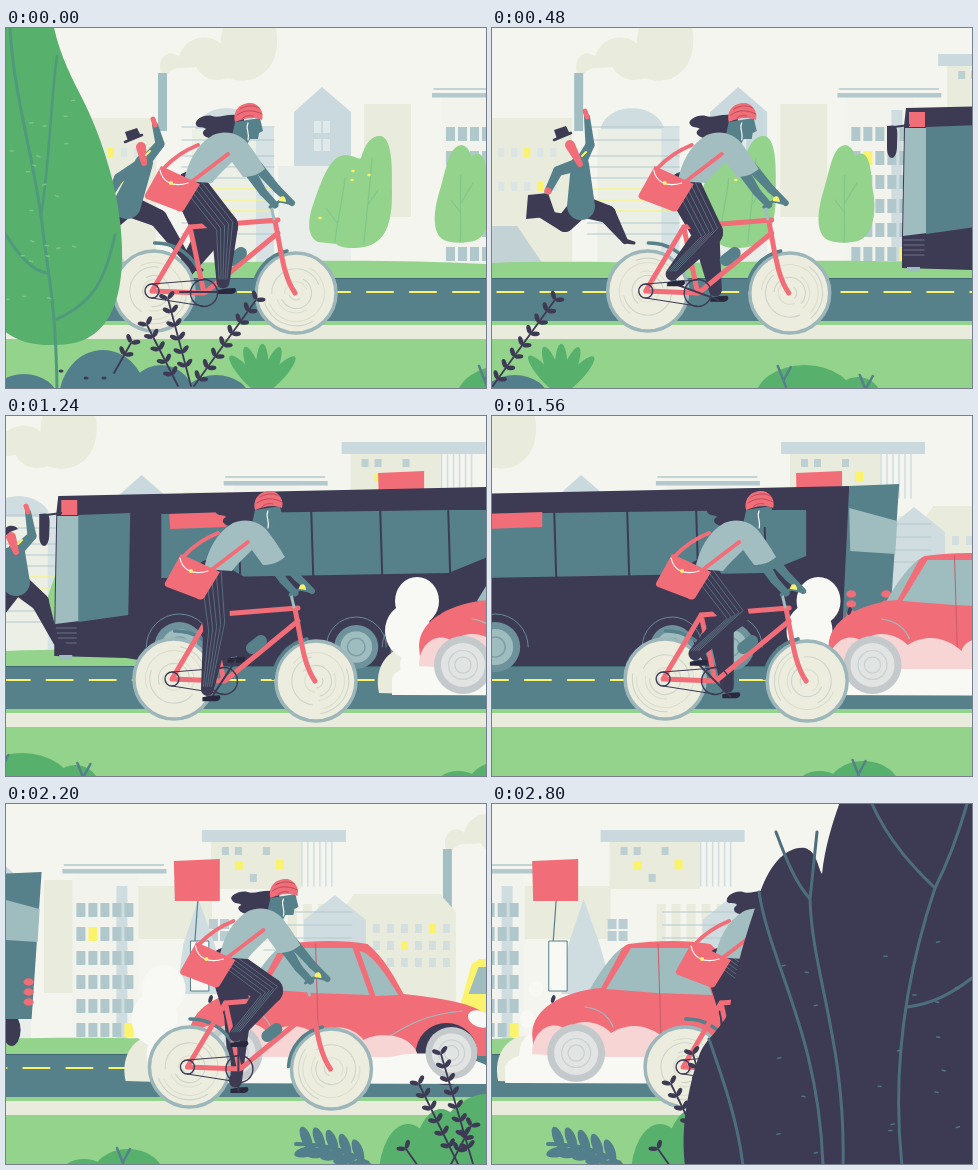
An HTML page with a canvas that plays this animation: 480x360 px, repeating every 2.84 s.

```html
<!DOCTYPE html>
<html lang="en">
<head>
<meta charset="utf-8">
<title>City ride</title>
<style>
html, body { margin: 0; width: 100%; height: 100%; overflow: hidden; background: #f4f5ef; }
canvas { display: block; width: 480px; height: 360px; }
</style>
</head>
<body>
<canvas id="stage" width="480" height="360"></canvas>
<script>
const g = document.getElementById('stage').getContext('2d');
const LOOP = 2840, STEP = 40;
const C = {
  sky: '#f4f5ef', cream: '#e9ebdc', mist: '#cfdde0', haze: '#b3c9ce', steel: '#9fbcbf',
  teal: '#56808a', ink: '#3d3a54', red: '#f16e78', pink: '#f6d5d4', yellow: '#fbf36c',
  lime: '#93d38c', green: '#57b06c', white: '#f8f8f4', blue: '#527f8b'
};

// Drawing helpers
function fill(color, d) { g.fillStyle = color; g.fill(new Path2D(d)); }
function line(color, width, d) {
  g.strokeStyle = color; g.lineWidth = width;
  g.lineCap = g.lineJoin = 'round';
  g.stroke(new Path2D(d));
}
function rect(color, x, y, w, h) { g.fillStyle = color; g.fillRect(x, y, w, h); }
function oval(color, x, y, rx, ry = rx, turn = 0) {
  g.fillStyle = color; g.beginPath(); g.ellipse(x, y, rx, ry, turn, 0, 7); g.fill();
}
function ring(color, width, x, y, r, from = 0, to = 2 * Math.PI) {
  g.strokeStyle = color; g.lineWidth = width; g.lineCap = 'round';
  g.beginPath(); g.arc(x, y, r, from, to); g.stroke();
}
function layer(x, draw) { g.save(); g.translate(x, 0); draw(); g.restore(); }
function limb(color, a, b, wa, wb) {
  const n = Math.atan2(b[1] - a[1], b[0] - a[0]);
  g.fillStyle = color; g.beginPath();
  g.arc(a[0], a[1], wa / 2, n + Math.PI / 2, n - Math.PI / 2);
  g.arc(b[0], b[1], wb / 2, n - Math.PI / 2, n + Math.PI / 2);
  g.fill();
}
function keyed(t, times, values) {
  let i = 0;
  while (i < times.length - 2 && t > times[i + 1]) i++;
  const k = Math.min(1, (t - times[i]) / (times[i + 1] - times[i]));
  return values[i] + (values[i + 1] - values[i]) * k;
}
function flecks(color, n, x, y, w, h) {
  let seed = 7;
  const rnd = () => (seed = seed * 16807 % 2147483647) / 2147483647;
  for (let i = 0; i < n; i++) {
    const px = x + rnd() * w, py = y + rnd() * h;
    line(color, 1.5, `M${px},${py}l3,${rnd() * 2 - 1}`);
  }
}

// Distant skyline
function chimney() {
  fill(C.cream, 'M155,45C150,30 164,19 173,29C178,9 202,4 215,16C212,-30 275,-30 271,15C270,45 246,59 222,50C206,56 194,47 190,39C180,41 168,37 162,46Z');
  rect('#a3bfc4', 152, 45, 9, 58);
}
function wires(x, w, ys, color) { for (const y of ys) line(color, 1.2, `M${x},${y}h${w}`); }
function skyline() {
  chimney();
  layer(605, chimney);
  rect(C.cream, 60, 90, 90, 150);
  for (let i = 0; i < 10; i++)
    rect(i === 2 || i === 8 ? C.yellow : '#dbe5e3', 76 + i % 5 * 13, i < 5 ? 120 : 154, 6, 9);
  fill('#c3d2d4', 'M70,198H95L120,235H70Z');
  rect('#e9eeea', 272, 138, 73, 97);
  fill('#cad9dd', 'M288,84L316,59L345,84V138H288Z');
  for (const y of [93, 111]) { rect('#e1eaeb', 308, y, 7, 12); rect('#e1eaeb', 317, y, 7, 12); }
  rect(C.cream, 358, 76, 47, 113);
  rect(C.cream, 440, 82, 86, 53);
  rect(C.cream, 525, 38, 90, 47);
  rect('#c9d9dd', 516, 26, 144, 12);
  for (let x = 616; x < 652; x += 6) line(C.mist, 1.5, `M${x},38V82`);
  for (const [x, y] of [[536, 43], [549, 43], [577, 43], [564, 70]]) rect('#bccfd3', x, y, 7, 8);
  rect(C.yellow, 549, 57, 8, 9); rect(C.yellow, 590, 56, 8, 9);
  for (const x of [523, 534]) for (const y of [115, 127]) rect('#b9cdd2', x, y, 9, 10);
  for (let x = 572; x < 635; x += 15) rect(C.cream, x, 100, 9, 38);
  fill(C.cream, 'M655,110L668,90H754L770,108V205H655Z');
  fill(C.mist, 'M618,116L649,91L680,116V235H618Z');
  wires(578, 88, [108, 121, 134, 146], C.haze);
  for (let i = 0; i < 18; i++)
    rect(i === 4 || i === 8 ? C.yellow : '#d3dfdf', 687 + i % 6 * 14, 120 + 17 * Math.floor(i / 6), 7, 9);
}
function nearBlocks() {
  fill(C.mist, 'M189,102C194,73 247,73 253,102Z');
  rect('#ecefe6', 186, 101, 66, 134);
  rect('#d6e2e4', 250, 100, 18, 135);
  wires(176, 92, [99, 112, 128, 139, 150, 195, 206], C.haze);
  wires(176, 92, [161, 172, 183], C.yellow);
  rect('#f2f3ec', 436, 69, 66, 166);
  rect(C.mist, 480, 82, 11, 153);
  line(C.haze, 1.5, 'M428,61H527');
  rect(C.haze, 426, 65, 104, 4.5);
  for (let col = 0; col < 5; col++) for (let row = 0; row < 6; row++) {
    const lit = col === 1 && row === 1 || col === 4 && row === 5;
    rect(lit ? C.yellow : '#b0c7cb', 440 + col * 12, 99 + row * 24, 9, 14);
  }
  fill(C.mist, 'M562,95L578,140L592,190H540L547,140Z');
}

// Roadside
function trees() {
  fill(C.lime, 'M312,214C300,208 302,190 308,174C317,148 325,127 340,127C350,128 352,132 355,130C360,112 368,107 375,108C387,112 386,140 386,165C386,195 380,215 358,219C345,221 335,220 330,216Z');
  line('#84c58d', 1.2, 'M329,214C330,200 336,175 339,150M358,215C360,190 364,160 366,130M331,195L320,180M361,178L372,162');
  for (const [x, y] of [[346, 152], [363, 147], [347, 143], [314, 190]]) oval(C.yellow, x, y, 1.8, 1.3);
  fill(C.lime, 'M438,212C426,206 427,185 433,165C440,143 442,119 455,117C465,118 465,132 466,128C478,118 482,140 482,158C488,180 484,208 468,213C455,216 445,215 438,212Z');
  line('#84c58d', 1.2, 'M454,214C456,200 453,175 455,147M455,185L445,172M455,175L467,155');
  layer(636, () => {
    line(C.teal, 1.2, 'M24,96L21,138');
    rect(C.white, 17, 137, 18, 50);
    line(C.teal, 1, 'M17,137h18v50h-18Z');
    fill(C.red, 'M0,57L46,55V97L1,97Z');
  });
}
function ground(t) {
  fill(C.lime, 'M0,235C80,232 150,236 240,234S400,232 480,236V252H0Z');
  rect(C.teal, 0, 250, 480, 44);
  line('#3f6671', 1.2, 'M0,250.5H480');
  const start = ((275 - t * .293) % 43 + 43) % 43 - 43;
  for (let x = start; x < 480; x += 43) line(C.yellow, 2.2, `M${x},264h26`);
  rect(C.lime, 0, 293, 480, 4);
  rect(C.cream, 0, 297, 480, 15);
  rect(C.lime, 0, 311, 480, 49);
}

// Man hailing the bus: joint positions at four moments
const MAN_TIMES = [0, 480, 840, 1240];
const MAN = {
  head: [135, 78, 62, 5, 119, 117, 129, 121],
  neck: [138, 88, 65, 10, 135, 136, 148, 136],
  hip: [121, 89, 62, 10, 177, 178, 184, 166],
  elbow: [154, 98, 86, 26, 116, 117, 140, 120],
  hand: [149, 95, 93, 22, 97, 89, 114, 96],
  elbow2: [113, 66, 45, -10, 150, 143, 155, 140],
  hand2: [105, 56, 23, -20, 165, 163, 168, 160],
  knee: [152, 115, 67, 34, 190, 186, 213, 186],
  foot: [187, 133, 65, 50, 240, 213, 242, 226],
  knee2: [100, 73, 57, -10, 198, 195, 212, 195],
  foot2: [90, 44, 47, -25, 215, 184, 240, 220]
};
function man(t) {
  const p = {};
  for (const k in MAN) p[k] = [keyed(t, MAN_TIMES, MAN[k].slice(0, 4)), keyed(t, MAN_TIMES, MAN[k].slice(4))];
  layer(-Math.max(0, t - 1240) * .25, () => {
    limb(C.teal, p.neck, p.elbow2, 13, 10);
    limb(C.teal, p.elbow2, p.hand2, 10, 7);
    const [bx, by] = p.hand2;
    fill(C.ink, `M${bx - 20},${by + 4}l20,-2l8,23l-30,3Z`);
    oval(C.red, bx, by, 3.5);
    for (const s of ['2', '']) {
      const knee = p['knee' + s], foot = p['foot' + s];
      limb(C.ink, p.hip, knee, 22, 18);
      limb(C.ink, knee, foot, 18, 6);
      limb(C.ink, foot, [foot[0] + 9, foot[1] + 2], 5, 3);
    }
    limb(C.teal, p.neck, p.hip, 18, 28);
    limb(C.teal, p.neck, p.elbow, 12, 9);
    limb(C.teal, p.elbow, p.hand, 9, 6);
    limb(C.red, p.hand, [p.hand[0] - 2, p.hand[1] - 6], 5, 5);
    limb(C.red, p.head, p.neck, 10, 6);
    const [hx, hy] = p.head;
    line(C.yellow, 2, `M${p.neck[0] + 2},${p.neck[1] - 8}l4,-4`);
    if (t < 700) {
      line(C.ink, 2.5, `M${hx - 16},${hy - 5}l17,-7`);
      fill(C.ink, `M${hx - 13},${hy - 6}l-3,-9l6,-2l6,-2l4,8Z`);
    } else fill(C.ink, `M${hx - 7},${hy}c-3,-12 10,-14 14,-8l-8,3Z`);
  });
}

// Vehicles
function busWheel(x, r) {
  oval('#6d929b', x, 231, r); oval(C.steel, x, 231, r * .72);
  ring('#7c9ea5', 1.5, x, 231, r * .4);
}
function bus() {
  fill(C.ink, 'M2,80L477,70V214L445,220L420,250H120L70,242L-2,240V208L0,98Z');
  oval(C.ink, 497, 226, 9, 16);
  fill(C.teal, 'M477,70L527,68L517,215H470Z');
  fill(C.steel, 'M477,92L525,105L523,138L478,135Z');
  line(C.ink, 3, 'M460,170V226L494,232');
  for (const x of [479, 514]) for (const y of [178, 188, 198]) oval(C.red, x, y, 5, 3.7);
  fill(C.steel, 'M1,100H23V205L-1,208Z');
  fill(C.teal, 'M22,99L74,97L72,199L22,206Z');
  rect(C.red, 5, 84, 16, 15);
  for (let y = 212; y < 232; y += 5) line('#6c7285', 1.2, `M0,${y}h20`);
  rect(C.steel, 3, 239, 13, 5);
  fill(C.ink, 'M-17,98C-6,96 -6,98 -7,118C-7,134 -17,133 -17,120Z');
  line(C.ink, 2, 'M-10,99L5,97');
  fill(C.teal, 'M105,98L392,94H434V140L392,157L105,162Z');
  for (const x of [182, 255, 324, 392]) line(C.ink, 2, `M${x},95l2,66`);
  fill(C.red, 'M113,98L170,96V111L114,113Z');
  for (const [x, r] of [[123, 25], [300, 22], [358, 24]]) {
    ring('#68899a', 1, x, 231, r + 8, Math.PI, 0);
    busWheel(x, r);
  }
}
function carWheel(x, r) {
  oval('#c4c9cc', x, 249, r); oval('#e1e4e2', x, 249, r * .76);
  ring('#c9d0d0', 1.2, x, 249, r * .5); ring('#c9d0d0', 1.2, x, 249, r * .28);
}
function car(t) {
  const puff = Math.max(0, Math.min(1, (t - 840) / 400, (3100 - t) / 900));
  layer(keyed(t, [600, 840, 1240, 2200, 2800], [60, -48, 0, -24, 6]), () => {
    fill(C.cream, 'M-166,277C-172,250 -155,230 -135,232L-100,245V279Z');
    oval(C.white, -128, 185, 22 * puff, 24 * puff);
    oval(C.white, -137, 215, 23 * puff, 27 * puff);
    oval(C.white, -115, 250, 30, 28);
  });
  layer(144, () => {
    fill(C.yellow, 'M0,204L12,160L20,155H100L125,190L170,205V250H-4Z');
    fill(C.steel, 'M9,190L19,163H55V190Z');
  });
  fill(C.red, 'M-126,230C-125,204 -97,190 -66,185C-57,170 -42,146 -30,140C0,136 30,136 52,140C70,155 79,174 88,190C130,195 165,199 178,218L181,252H-124Z');
  fill(C.steel, 'M-68,185C-59,169 -46,150 -35,143L-57,184ZM-52,185L-27,144H37L54,191L-1,189ZM44,147C57,149 73,175 83,191L60,192Z');
  line('#c65d6c', 1, 'M0,140L3,240');
  line(C.steel, 1.2, 'M-73,203C-58,205 -49,213 -45,223M70,235C90,222 110,210 147,207');
  oval(C.ink, -105, 195, 2, 4, .3);
  oval(C.ink, 131, 250, 31);
  oval(C.white, 164, 215, 12, 8, .4);
  fill(C.pink, 'M-126,248C-125,225 -105,215 -92,226C-77,211 -55,220 -47,229C-26,216 -6,223 7,235C13,217 38,222 48,236C58,229 96,226 103,253H-126Z');
  fill(C.white, 'M-153,279V262C-144,245 -115,251 -95,253H75C102,246 152,250 172,262V280Z');
  carWheel(-82, 29); carWheel(136, 26);
}

// Cyclist
function wheel(x, y, r, spin) {
  oval('#ecedde', x, y, r); ring('#9cb6ba', 3.5, x, y, r - 1);
  for (let i = 0; i < 7; i++) {
    const from = spin + i * 2.1;
    ring(i % 2 ? '#dcdfcc' : '#cdd5cb', 1.1, x, y, 7 + i * 4.3, from, from + 1.8 + i % 3);
  }
}
function leg(turn, near) {
  const hip = [185, 161];
  const pedal = [196 + 23 * Math.cos(turn), 263 + 23 * Math.sin(turn)];
  const foot = [pedal[0] - 2, pedal[1] - 9];
  const dx = foot[0] - hip[0], dy = foot[1] - hip[1];
  const thigh = 50, shin = 56, dist = Math.min(105, Math.hypot(dx, dy));
  const bend = Math.acos((thigh * thigh + dist * dist - shin * shin) / (2 * thigh * dist));
  const dir = Math.atan2(dy, dx) - bend;
  const knee = [hip[0] + thigh * Math.cos(dir), hip[1] + thigh * Math.sin(dir)];
  limb(C.teal, foot, pedal, 6, 6);
  fill('#29283c', `M${pedal[0] - 7},${pedal[1] - 1}q8,-2 17,-2q3,4 -3,6h-14Z`);
  limb(C.ink, hip, knee, 35, 27);
  limb(C.ink, knee, foot, 27, 13);
  if (near) for (let i = -2; i <= 2; i++)
    line('#5b7382', .9, `M${hip[0] + i * 5},${hip[1] - 6 - i}L${knee[0] + i * 4},${knee[1] - i * 2}L${foot[0] + i * 2},${foot[1] - 3}`);
}
function cyclist(t) {
  const turn = keyed(t, [0, 480, 840, 1240, 1700, LOOP], [0, 200, 312, 483, 630, 630]) * Math.PI / 180;
  leg(turn + Math.PI, false);
  wheel(148, 263, 41, t * .009);
  wheel(290, 265, 41, t * .009 + 1);
  ring(C.teal, 3.5, 150, 262, 47, -1.6, -.5);
  ring(C.teal, 3.5, 290, 265, 43, 3.2, 4.5);
  line(C.red, 5, 'M146,263L184,199L198,265ZM184,199L272,192M200,264L272,205');
  line(C.red, 5, 'M269,193C275,222 277,248 289,265');
  line(C.steel, 3, 'M268,191L265,178');
  limb(C.teal, [226, 232], [235, 225], 12, 12);
  ring(C.ink, 1.4, 146, 263, 7); ring(C.ink, 1.4, 198, 265, 13.5);
  line(C.ink, 1.2, 'M146,256L197,252M146,270L197,278');
  const cx = 23 * Math.cos(turn), cy = 23 * Math.sin(turn);
  line(C.ink, 2, `M${197 - cx},${264 - cy}L${197 + cx},${264 + cy}`);
  leg(turn, true);
  // Hair, head and helmet
  const sway = Math.sin(t / 130) * 2;
  fill(C.ink, `M238,88C222,84 213,91 206,88C198,86 188,92 190,${97 + sway}C193,101 198,98 200,101C191,${106 + sway} 204,114 212,108C220,112 229,108 238,104Z`);
  fill(C.teal, 'M229,94L254,90L257,103L253,105L252,111L244,111L240,119L226,108Z');
  fill(C.red, 'M229,94C226,80 237,74 246,75C255,77 258,86 256,92C247,88 237,91 229,94Z');
  line('#b64f60', 1, 'M231,87C239,81 248,82 256,86M234,81C241,77 248,77 253,80M236,91C238,88 243,87 247,88');
  line(C.white, 1.2, 'M242,95C239,101 244,104 242,112');
  // Arms, shirt and bag
  limb(C.teal, [251, 138], [271, 161], 11, 8); limb(C.teal, [271, 161], [286, 175], 8, 6);
  limb(C.teal, [242, 141], [257, 164], 12, 8); limb(C.teal, [257, 164], [269, 177], 8, 7);
  line(C.teal, 3, 'M264,179L274,173L287,176');
  fill(C.yellow, 'M273,173C273,167 280,166 280,174Z');
  fill('#a3bec0', 'M178,153C182,134 190,117 207,107C220,101 236,106 243,117C250,126 256,136 259,141C252,147 245,149 237,149L226,134C218,142 211,148 206,155Z');
  line(C.red, 4, 'M158,140Q172,125 192,117M184,155L222,126');
  fill(C.red, 'M155,138L194,156L178,182Q175,185 170,182L141,171Q137,169 140,165Z');
  line(C.white, 1.2, 'M154,142C156,153 166,160 182,155');
  oval(C.yellow, 165, 155, 2);
}

// Foreground plants
function sprig(x, y, tipX, tipY) {
  line(C.ink, 1.8, `M${x},${y}L${tipX},${tipY}`);
  const dir = Math.atan2(tipY - y, tipX - x), length = Math.hypot(tipX - x, tipY - y);
  for (let s = length; s > 8; s -= 14) for (const side of [-1, 1]) {
    const a = dir + side * .9;
    oval(C.ink, x + s * Math.cos(dir) + 5 * Math.cos(a), y + s * Math.sin(dir) + 5 * Math.sin(a), 4.5, 2.3, a);
  }
}
function fan(x, y, size) {
  for (let a = -2.3; a < -.7; a += .37)
    oval(C.green, x + size * .5 * Math.cos(a), y + size * .5 * Math.sin(a), size * .55, size * .14, a);
}
function fern(x) {
  line(C.blue, 4, `M${x},340Q${x + 45},340 ${x + 75},362`);
  for (let i = 0; i < 5; i++) for (const side of [-1, 1])
    oval(C.blue, x + 10 + i * 13, 341 + i * i * .8 + side * 7, 12, 5, side * -.7 + .5);
}
function bush(color, ...lobes) {
  for (const [x, top, rx] of lobes) oval(color, x, 372, rx, 372 - top);
}
function twigs(x, y) { line(C.teal, 2.5, `M${x},${y + 24}l-9,-23M${x - 3},${y + 15}l7,-13`); }
function plants() {
  bush(C.blue, [18, 346, 34], [97, 322, 44], [155, 337, 34], [210, 347, 34]);
  sprig(172, 358, 141, 297); sprig(185, 358, 162, 271); sprig(188, 358, 250, 272);
  sprig(108, 345, 125, 315);
  for (const x of [55, 80, 98]) oval(C.ink, x, 342 + x % 9, 2.5, 1.5);
  fan(256, 364, 46);
  bush(C.green, [500, 337, 50], [553, 349, 24]); twigs(482, 337); twigs(564, 346);
  bush(C.green, [936, 355, 24], [980, 345, 36]); twigs(978, 343);
  fern(1148);
  bush(C.green, [1260, 320, 29], [1293, 305, 30], [1340, 290, 60]);
  sprig(1310, 360, 1271, 280); sprig(1325, 360, 1293, 250);
  sprig(1302, 362, 1323, 322); sprig(1270, 362, 1258, 345);
}
function greenTree() {
  fill(C.green, 'M-200,0H48C55,30 66,50 77,72C95,108 115,165 116,220C117,270 105,317 50,317C25,318 8,312 -5,300H-200Z');
  line('#4f9a7c', 3, 'M4,0C8,70 27,125 36,195C42,248 50,275 51,362M51,291C92,273 101,243 109,207M40,245C24,241 12,226 0,207');
  line('#4f9a7c', 2.5, 'M51,28C45,70 43,140 35,188');
  flecks('#7cc387', 22, 0, 60, 72, 230);
}
function darkBush() {
  fill(C.ink, 'M193,362C188,325 197,280 207,252C212,235 232,224 238,204C242,167 255,128 266,95C276,61 294,42 313,44C325,48 325,61 330,70C333,43 340,20 348,-2H900V362Z');
  line('#4d6f7d', 3, 'M284,28C294,55 303,78 318,95L325,28M318,95C320,170 354,240 351,362M267,88C278,160 327,230 331,362M380,0C397,38 423,65 443,84M475,0C465,35 454,62 443,84C416,165 399,260 410,362M480,174C459,190 440,200 415,203M217,235C230,273 246,317 251,362');
  flecks('#4d7783', 45, 285, 100, 480, 250);
}

function draw(t) {
  rect(C.sky, 0, 0, 480, 360);
  layer(-t * .1455, skyline);
  layer(-t * .168, nearBlocks);
  ground(t);
  layer(-t * .2128, trees);
  const u = t - 480;
  layer(412 - .437 * u - 5.13e-5 * u * u, bus);
  man(t);
  layer(539 - .239 * (t - 1240), () => car(t));
  layer(t * .0161, () => cyclist(t));
  layer(-t * .39, plants);
  layer(-t * .6, greenTree);
  layer((2800 - t) * .6, darkBush);
}
function frame() {
  draw(Math.floor(performance.now() % LOOP / STEP) * STEP);
  requestAnimationFrame(frame);
}
frame();
</script>
</body>
</html>
```
